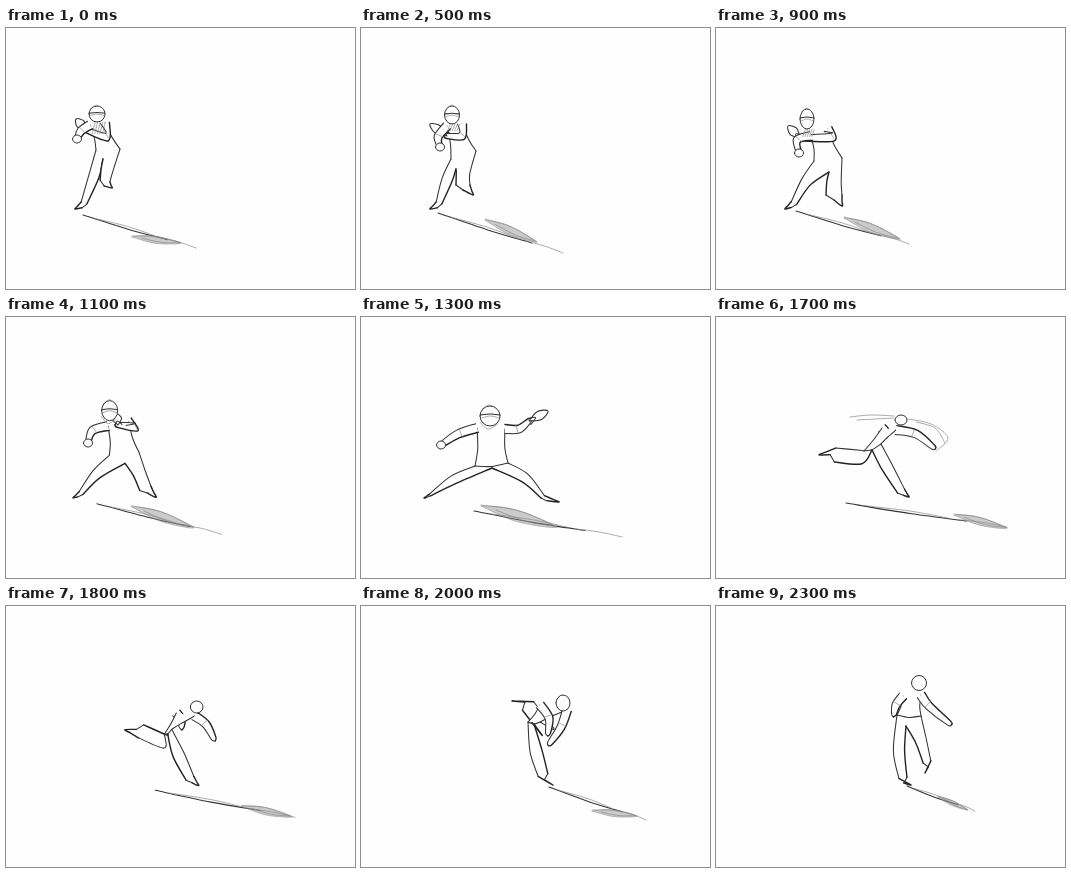
Write an HTML page that moves like this. It is 349 px wide and 261 px high and loops after 2.5 s.

```html
<!DOCTYPE html>
<html lang="en">
<head>
<meta charset="utf-8">
<title>Pitcher</title>
<style>
html, body { margin: 0; width: 100%; height: 100%; overflow: hidden; background: #fefefe; }
svg { display: block; width: 100vw; height: 100vh; }
path { stroke-linecap: round; stroke-linejoin: round; }
</style>
</head>
<body>
<svg viewBox="0 0 349 261" preserveAspectRatio="none"><g id="stage"></g></svg>
<script>
const paper = '#fefefe';
const stage = document.getElementById('stage');
const keys = [];
const key = (at, pose) => keys.push({ at, pose });

// Arms: shoulder, elbow, hand (and glove tip). Legs: hip, knee, ankle, toe, ankle half width.
key(0, {
  head: [91, 86, 8, 8], pitch: [84, 97, 75, 103, 71, 111], catch: [99, 95, 101, 109, 80, 102, 70, 91],
  push: [90, 122, 88, 148, 78, 175, 69, 181, 3], lead: [114, 121, 101, 142, 99, 153, 106, 160, 5],
  crotch: [97, 131], shadow: [77, 187, 190, 220], smudge: [126, 209, 175, 215]
});
key(500, {
  head: [91, 87, 7.5, 9], pitch: [86, 98, 77, 109, 79, 119], catch: [101, 96, 101, 108, 86, 108, 69, 96],
  push: [90, 131, 86, 152, 78, 175, 69, 181, 3], lead: [115, 123, 102, 145, 102, 157, 112, 167, 7],
  crotch: [95, 141], shadow: [77, 185, 202, 225], smudge: [124, 192, 176, 214]
});
key(1000, {
  head: [91, 91, 7, 10], pitch: [95, 108, 81, 112, 83, 125], catch: [112, 101, 117, 109, 84, 110, 72, 98],
  push: [98, 133, 90, 154, 78, 175, 69, 181, 3], lead: [126, 130, 118, 154, 118, 167, 126, 178, 8],
  crotch: [113, 144], shadow: [80, 183, 193, 216], smudge: [128, 190, 184, 211]
});
key(1300, {
  head: [129, 99, 10, 10], pitch: [116, 111, 97, 117, 80, 128], catch: [144, 112, 158, 112, 168, 104, 187, 94],
  push: [114, 149, 92, 163, 69, 178, 63, 181, 1], lead: [147, 146, 164, 161, 182, 180, 198, 185, 2],
  crotch: [131, 151], shadow: [113, 194, 261, 220], smudge: [120, 189, 196, 210]
});
key(1700, {
  head: [185, 103, 6, 5], pitch: [180, 113, 200, 117, 217, 130], catch: [166, 111, 169, 114, 170, 118, 170, 118],
  push: [148, 134, 145, 140, 119, 138, 103, 138, 7], lead: [165, 127, 171, 150, 185, 174, 193, 180, 4],
  crotch: [156, 133], shadow: [130, 186, 291, 210], smudge: [238, 198, 291, 211]
});
key(2000, {
  head: [202, 97, 7, 8], pitch: [206, 104, 200, 121, 189, 137], catch: [179, 99, 188, 112, 187, 127, 187, 127],
  push: [179, 116, 187, 126, 167, 100, 151, 95, 7], lead: [167, 116, 175, 145, 182, 169, 192, 179, 5],
  crotch: [173, 118], shadow: [188, 181, 285, 214], smudge: [231, 205, 276, 210]
});
key(2300, {
  head: [203, 77, 7.5, 7.5], pitch: [205, 89, 213, 100, 233, 117], catch: [187, 90, 180, 99, 178, 108, 178, 108],
  push: [205, 110, 205, 135, 211, 156, 209, 167, 4], lead: [181, 109, 183, 145, 187, 172, 195, 179, 4],
  crotch: [190, 120], shadow: [191, 180, 259, 205], smudge: [222, 191, 252, 204]
});

const mix = (a, b, u) => a + (b - a) * u;
const add = (a, b, k = 1) => [a[0] + b[0] * k, a[1] + b[1] * k];
const sub = (a, b) => add(a, b, -1);
const along = (a, b, u) => [mix(a[0], b[0], u), mix(a[1], b[1], u)];
const size = a => Math.hypot(a[0], a[1]);
const unit = a => { const s = size(a) || 1; return [a[0] / s, a[1] / s]; };
const side = a => { const [x, y] = unit(a); return [-y, x]; };
const gap = (a, b) => size(sub(a, b));
const pairs = list => {
  const out = [];
  for (let i = 0; i + 1 < list.length; i += 2) out.push([list[i], list[i + 1]]);
  return out;
};

let ink = '';
const path = (d, color, width, fill = 'none') => {
  ink += `<path d="${d}" stroke="${color}" stroke-width="${width}" fill="${fill}"/>`;
};

// A loose curve through all points.
function curve(p) {
  let d = 'M' + p[0];
  for (let i = 0; i < p.length - 1; i++) {
    const a = p[i - 1] || p[i], b = p[i], c = p[i + 1], e = p[i + 2] || c;
    d += `C${add(b, sub(c, a), 1 / 6)} ${add(c, sub(e, b), -1 / 6)} ${c}`;
  }
  return d;
}
const bold = (...p) => path(curve(p), '#222', 1.4);
const line = (...p) => path(curve(p), '#333', 1.05);
const thin = (...p) => path(curve(p), '#888', .7);
const blank = (...p) => path(curve(p) + 'Z', 'none', 0, paper);
const oval = ([x, y, rx, ry]) =>
  path(`M${x - rx},${y}a${rx},${ry} 0 1 1 ${2 * rx},0a${rx},${ry} 0 1 1 ${-2 * rx},0`, '#333', 1, paper);

function shadow(main, smudge) {
  const [a, b] = pairs(main), [c, d] = pairs(smudge);
  const n = side(sub(b, a)), m = side(sub(d, c)), w = gap(c, d) * .07;
  line(a, add(along(a, b, .4), n, 1), along(a, b, .75));
  thin(along(a, b, .7), add(along(a, b, .85), n, -1), b);
  thin(along(a, b, .1), add(along(a, b, .4), n, -1.5), along(a, b, .65));
  path(curve([c, add(along(c, d, .4), m, -w), d, add(along(c, d, .5), m, w), c]), '#888', .5, 'rgba(140,140,140,.45)');
  thin(add(c, m, -1), add(along(c, d, .5), m, -w), d);
  thin(along(c, d, .2), add(along(c, d, .6), m, w * .5), along(c, d, .95));
}

function leg(data, crotch) {
  const [hip, knee, ankle, toe] = pairs(data), w = data[8];
  const root = along(hip, crotch, .5);
  const n = side(sub(ankle, root)), m = side(sub(ankle, knee));
  const out = sub(hip, crotch);
  const s = out[0] * n[0] + out[1] * n[1] < 0 ? -1 : 1;
  const kw = 4 + w * .4;
  const outer = [hip, add(knee, n, s * kw), add(ankle, m, s * w)];
  const inner = [crotch, add(knee, n, -s * kw), add(ankle, m, -s * w)];
  const heel = add(ankle, unit(sub(ankle, knee)), 5);
  const foot = [outer[2], toe, heel, inner[2]];
  path('M' + [...outer, ...inner.reverse()].join('L') + 'Z', 'none', 0, paper);
  path('M' + foot.join('L') + 'Z', 'none', 0, paper);
  line(...outer);
  bold(...inner.reverse());
  bold(outer[2], along(outer[2], toe, .6), toe, heel);
  line(heel, inner[2]);
}

function arm(data) {
  const [top, elbow, hand] = pairs(data);
  const n = side(sub(elbow, top)), k = side(sub(hand, top)), m = side(sub(hand, elbow));
  const a = [add(top, n, 4.5), add(elbow, k, 4), add(hand, m, 2.5)];
  const b = [add(top, n, -4.5), add(elbow, k, -4), add(hand, m, -2.5)];
  const tip = add(hand, unit(sub(hand, elbow)), 3);
  blank(...a, tip, ...b.slice().reverse());
  line(...a, tip);
  bold(...b, tip);
  thin(along(a[0], a[1], .85), along(b[0], b[1], .85));
}

function glove(data) {
  const [base, tip] = pairs(data).slice(2);
  if (gap(base, tip) < 6) return;
  const n = side(sub(tip, base)), mid = along(base, tip, .55);
  const shape = [base, add(mid, n, 4.5), tip, add(mid, n, -4.5), base];
  blank(...shape);
  line(...shape);
  line(add(base, n, 4), along(base, tip, .35), add(base, n, -3));
}

function torso(p) {
  const [pitch] = pairs(p.pitch), [grip] = pairs(p.catch);
  let [hipA] = pairs(p.push), [hipB] = pairs(p.lead);
  // Pair each shoulder with the hip that keeps the sides from crossing.
  if (gap(pitch, hipA) + gap(grip, hipB) > gap(pitch, hipB) + gap(grip, hipA)) [hipA, hipB] = [hipB, hipA];
  const mid = along(along(pitch, grip, .5), along(hipA, hipB, .5), .55);
  const waist = (a, b) => along(along(a, b, .55), mid, .12);
  const left = [pitch, waist(pitch, hipA), hipA], right = [grip, waist(grip, hipB), hipB];
  path('M' + [...left, ...right.slice().reverse()].join('L') + 'Z', 'none', 0, paper);
  line(...left);
  line(...right);
  return [hipA, hipB];
}

function head(p, t) {
  const [x, y, rx, ry] = p.head;
  const at = (u, v) => [x + u * rx, y + v * ry];
  if (t < 1100) {
    for (let i = 0; i < 5; i++) {
      const u = i * .32 - .5;
      thin(at(u + .25, 1.05), at(u - .1, 1.75 + (t ? 0 : .7)));
    }
  } else if (t < 1700) {
    thin(at(-1, .6), at(-.2, 1.3), at(.8, .8));
  }
  oval(p.head);
  if (t > 1600) return;
  line(at(-1, -.1), at(0, -.2), at(1, -.1));
  thin(at(-.8, -.7), at(0, -1.1), at(.8, -.6));
  thin(at(-.8, .2), at(0, 0), at(.9, .2));
}

function poseAt(t) {
  const i = Math.min(keys.filter(k => k.at <= t).length, keys.length - 1);
  const a = keys[i - 1], b = keys[i], u = (t - a.at) / (b.at - a.at);
  const p = {};
  for (const part in a.pose) {
    // The throw starts late and swings over the shoulder.
    const whip = part === 'pitch' && a.at === 1300;
    p[part] = a.pose[part].map((v, j) => {
      const lift = whip && j % 2 ? Math.sin(Math.PI * u) * 14 * ((j - 1) / 2) : 0;
      return mix(v, b.pose[part][j], whip && j > 1 ? u * u : u) - lift;
    });
  }
  return p;
}

function figure(t) {
  const p = poseAt(t), late = t > 1500, [crotch] = pairs([...p.crotch]);
  ink = '';
  shadow(p.shadow, p.smudge);
  const tucked = t > 1400 && t < 1900;
  if (tucked) arm(p.catch);
  for (const part of late ? ['lead', 'push'] : ['push', 'lead']) leg(p[part], crotch);
  const [hipA, hipB] = torso(p);
  if (t > 1100) line(hipA, add(along(hipA, hipB, .5), [0, 2]), hipB);
  if (!tucked) arm(p.catch);
  glove(p.catch);
  arm(p.pitch);
  if (t < 1700) oval([p.pitch[4], p.pitch[5], 4.5, 4]);
  head(p, t);
  if (t === 1700) {
    thin([134, 100], [155, 98], [178, 99]);
    thin([141, 103], [178, 101]);
    thin([191, 102], [215, 107], [232, 121], [220, 134]);
    thin([200, 105], [219, 111], [229, 126]);
  }
  return ink;
}

// Long holds at first, then a new drawing every 100 ms, then a last hold.
function hold(t) {
  if (t < 500) return 0;
  if (t < 900) return 500;
  if (t < 1100) return 1000;
  return Math.min(2300, Math.floor(t / 100) * 100);
}

let shown = -1;
const began = performance.now();
function tick() {
  const t = hold((performance.now() - began) % 2500);
  if (t !== shown) {
    stage.innerHTML = figure(t);
    shown = t;
  }
  requestAnimationFrame(tick);
}
tick();
</script>
</body>
</html>
```
